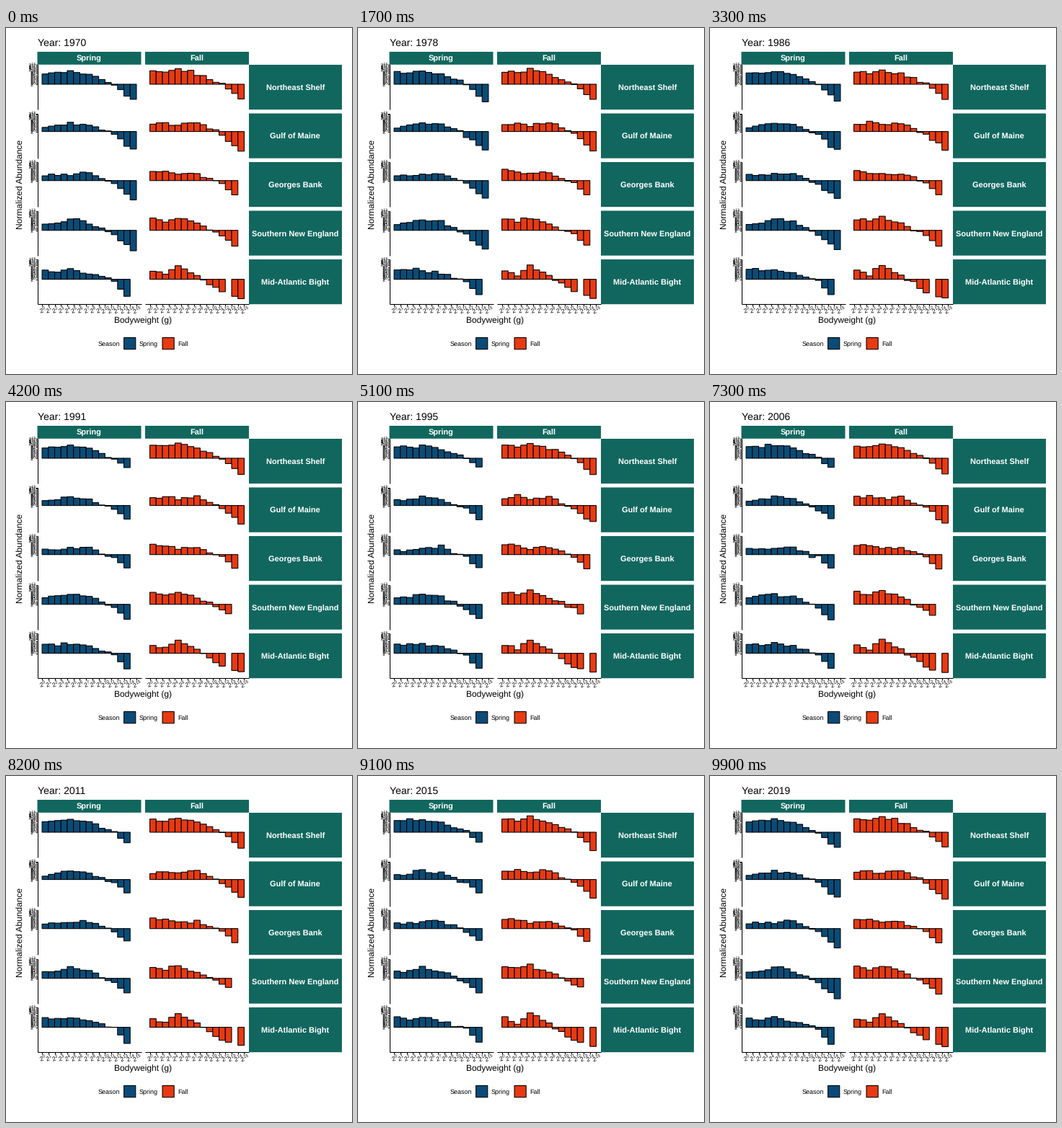
Recreate the animation shown at these times as a matplotlib script. Size 480 by 480 pixels, loop 10000 ms.

```python
import numpy as np
import matplotlib.pyplot as plt
from matplotlib.animation import FuncAnimation
from matplotlib.collections import LineCollection, PolyCollection
from matplotlib.patches import PathPatch, Rectangle
from matplotlib.path import Path
from matplotlib.textpath import TextPath
from matplotlib.transforms import Affine2D

plt.rcParams["text.hinting"] = "none"

SIZE, FRAMES, STEP = 480, 100, 100
PT = 0.72  # points per pixel at 100 dpi
FONT = "Liberation Sans"
GREEN, BLUE, ORANGE = "#11675e", "#0a4c77", "#e63a12"
LINE = 1.07 * PT

# Layout in pixels
TOP, PITCH, ROW_H = 51, 67.5, 62.2
COL_W = 144
LEFT = (43.5, 193)
BINS = 15
BAR_W = COL_W / (BINS * 1.1)     # 5 % margin on either side
BAR_X = [x + 0.75 * BAR_W for x in LEFT]

FIRST_YEAR, YEARS = 1970, 49     # years until the loop closes

# Typical size spectrum: heights at a few size classes, joined by lines
AT = (0, 2, 4, 7, 11, 14)
REGIONS = {  # name: (zero line, spring, fall)
    "Northeast Shelf":
        (78, (15, 16, 18, 14, 0, -23), (18, 16, 20, 14, 0, -22)),
    "Gulf of Maine":
        (143.6, (6, 9, 12, 9, -5, -26), (10, 12, 9, 12, -4, -25)),
    "Georges Bank":
        (211.7, (7, 7, 9, 10, -4, -25), (14, 12, 9, 10, -3, -27)),
    "Southern New England":
        (280.7, (9, 11, 15, 11, -6, -27), (17, 13, 18, 9, -7, -29)),
    "Mid-Atlantic Bight":
        (348.6, (13, 12, 14, 9, -2, -31), (11, 7, 19, 5, -18, -26)),
}
BASE = [region[0] for region in REGIONS.values()]


def yearly_heights():
    """Spectra as [year, row, season, bin] with seeded yearly variation."""
    typical = np.array([[np.interp(np.arange(BINS), AT, pts)
                         for pts in seasons]
                        for _, *seasons in REGIONS.values()])
    rng = np.random.default_rng(FIRST_YEAR)
    noise = rng.normal(0, 1.2, (YEARS, *typical.shape))
    return typical + noise


def catches():
    """Which size classes hold any fish, as [year, row, season, bin]."""
    full = np.ones(HEIGHTS.shape, bool)
    full[20:, :, 0, -1] = False      # the largest class leaves spring
    full[:, 4, 0, -1] = False
    full[:, 2:4, 1, -1] = False
    full[20:, 3, 1, -2] = False
    full[:25, 4, 1, 12] = False      # a gap that moves up one class
    full[25:, 4, 1, 13] = False
    return full


HEIGHTS = yearly_heights()
SHOWN = catches()


def bars(i, col):
    # Each year is reached on an odd frame, with a straight move between
    t = max(i - 1, 0) / 2
    year, u = int(t), t % 1
    h = ((1 - u) * HEIGHTS[year % YEARS, :, col]
         + u * HEIGHTS[(year + 1) % YEARS, :, col])
    shown = SHOWN[i // 2 % YEARS, :, col]
    verts = []
    for row, base in enumerate(BASE):
        for b in np.flatnonzero(shown[row]):
            x, y = BAR_X[col] + b * BAR_W, base - h[row, b]
            verts.append([(x, base), (x, y), (x + BAR_W, y), (x + BAR_W, base)])
    return verts


fig = plt.figure(figsize=(SIZE / 100, SIZE / 100), dpi=100, facecolor="white")
ax = fig.add_axes([0, 0, 1, 1])
ax.set(xlim=(0, SIZE), ylim=(SIZE, 0))
ax.axis("off")


def text(x, y, s, size, **kw):
    return ax.text(x, y, s, fontsize=size * PT, family=FONT,
                   va="baseline", **kw)


def box(x, y, w, h, color, **kw):
    kw = {"linewidth": 0, **kw}
    ax.add_patch(Rectangle((x, y), w, h, facecolor=color, snap=False, **kw))


def power(k, x, y, size, angle=0, right=False):
    """Outline of 2^k centred on (x, y), or ending at x."""
    two = TextPath((0, 0), "2", size=size, prop={"family": FONT})
    exp = TextPath((0.57 * size, 0.4 * size), str(k), size=0.7 * size,
                   prop={"family": FONT})
    path = Path.make_compound_path(two, exp)
    path = Affine2D().rotate_deg(angle).scale(1, -1).transform_path(path)
    ext = path.get_extents()
    dx = x - (ext.x1 if right else (ext.x0 + ext.x1) / 2)
    dy = y - (ext.y0 + ext.y1) / 2
    return Affine2D().translate(dx, dy).transform_path(path)


# Strips
bold = dict(color="white", weight="bold", ha="center")
for x, name in zip(LEFT, ("Spring", "Fall")):
    box(x, 33, COL_W, 17.8, GREEN)
    text(x + COL_W / 2, 46, name, 11, **bold)
for row, name in enumerate(REGIONS):
    y = TOP + row * PITCH
    box(337, y, 129, ROW_H, GREEN)
    text(401.3, y + ROW_H / 2 + 4.6, name, 11, **bold)

# Axes
lines, labels = [], []
floor = TOP + 4 * PITCH + ROW_H
for row, base in enumerate(BASE):
    y = TOP + row * PITCH
    lines.append([(LEFT[0], y), (LEFT[0], y + ROW_H)])
    for k in range(14):
        ty = base - k * (base - y) / 13
        lines.append([(40.8, ty), (LEFT[0], ty)])
        labels.append(power(k, 40.5, ty, 6.8, right=True))
for x, start in zip(LEFT, BAR_X):
    lines.append([(x, floor), (x + COL_W, floor)])
    for k in range(BINS + 1):
        tx = start + k * BAR_W
        lines.append([(tx, floor), (tx, floor + 2.75)])
        labels.append(power(k, tx + 0.3, 391, 8.5, angle=20))
ax.add_collection(LineCollection(lines, colors="black", linewidths=LINE))
ax.add_patch(PathPatch(Path.make_compound_path(*labels),
                       facecolor="black", linewidth=0))

# Titles and legend
title = text(43.5, 25, "", 14)
text(190.3, 409.2, "Bodyweight (g)", 12, ha="center")
text(23, 217.3, "Normalized Abundance", 12, ha="center",
     rotation=90, rotation_mode="anchor")
text(127.5, 441.2, "Season", 9)
for x, name, color in ((163.6, "Spring", BLUE), (217, "Fall", ORANGE)):
    box(x, 429.5, 16.2, 16.2, color, edgecolor="black", linewidth=LINE)
    text(x + 21.4, 441.2, name, 9)

layers = [PolyCollection([], facecolors=color, edgecolors="black",
                         linewidths=LINE, joinstyle="miter", snap=False)
          for color in (BLUE, ORANGE)]
for layer in layers:
    ax.add_collection(layer, autolim=False)


def update(i):
    title.set_text(f"Year: {FIRST_YEAR + round(i * YEARS / (FRAMES - 1))}")
    for col, layer in enumerate(layers):
        layer.set_verts(bars(i, col))
    return [title, *layers]


anim = FuncAnimation(fig, update, frames=FRAMES, interval=STEP,
                     repeat=True, repeat_delay=0)
plt.show()
```
